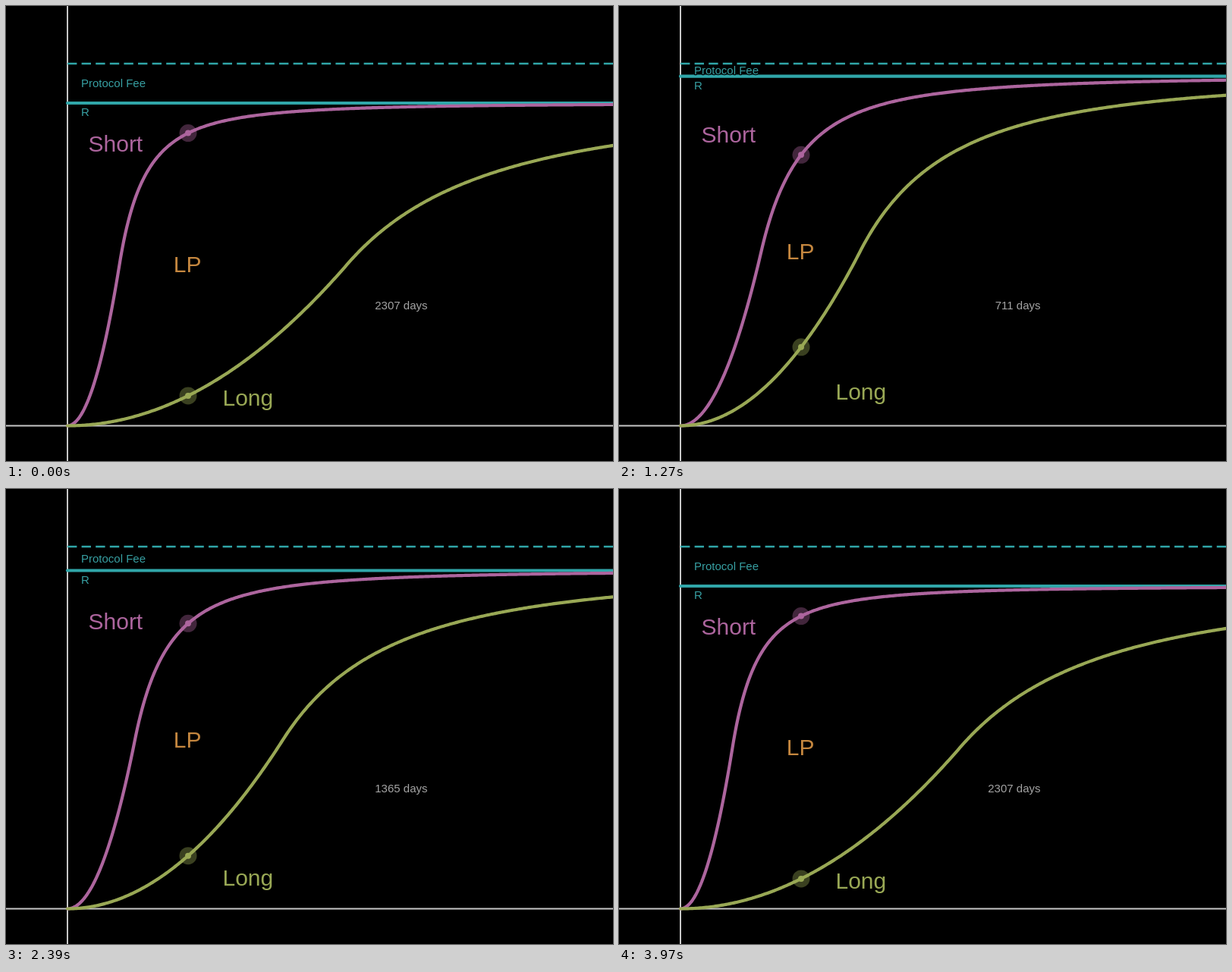
Recreate the animation shown at these times as an HTML page. Size 800 by 600 pixels, loop 4 s.

```html
<!DOCTYPE html>
<html lang="en">
<head>
<meta charset="utf-8">
<title>Decay of long and short payoffs</title>
<style>
  html, body { margin: 0; width: 100%; height: 100%; overflow: hidden; background: #000; }
  svg { display: block; width: 800px; height: 600px; }
  text {
    font: 15px "Liberation Sans", Arial, sans-serif;
    stroke: #000; stroke-width: 2.5; stroke-linejoin: round; paint-order: stroke;
  }
  .big { font-size: 30px; }
  .axis { stroke: #c6c6c6; stroke-width: 2; }
  .curve { fill: none; stroke-width: 4.2; stroke-linecap: round; stroke-linejoin: round; }
  .teal { stroke: #30a6a9; }
  .halo { opacity: .38; }
  .tealText { fill: #379fa2; }
  .purple { fill: #ad659e; }
  .green { fill: #99a855; }
  .orange { fill: #c5873f; }
  .grey { fill: #a3a3a3; }
  .curve.purple { fill: none; stroke: #ad659e; }
  .curve.green { fill: none; stroke: #99a855; }
</style>
</head>
<body>
<svg viewBox="0 0 800 600">
  <path class="axis" d="M0 553.5H800M81 0V600"/>
  <path class="teal" d="M81 76H800" stroke-width="2.5" stroke-dasharray="12.4 6.2"/>
  <path class="teal" id="cap" d="M81 0H800" stroke-width="4.2" stroke-linecap="round"/>
  <path class="curve purple" id="shortCurve"/>
  <path class="curve green" id="longCurve"/>
  <g class="purple" id="shortDot"><circle class="halo" r="11.5"/><circle r="4"/></g>
  <g class="green" id="longDot"><circle class="halo" r="11.5"/><circle r="4"/></g>
  <text class="tealText" id="fee" x="99">Protocol Fee</text>
  <text class="tealText" id="reserve" x="99">R</text>
  <text class="big purple" id="shortLabel" x="108.5">Short</text>
  <text class="big orange" id="lpLabel" x="220.8">LP</text>
  <text class="big green" id="longLabel" x="285.5">Long</text>
  <text class="grey" id="days" x="555.5" y="400.3" text-anchor="end"></text>
</svg>
<script>
const LOOP = 4000, LEFT = 81, RIGHT = 800, BASE = 553.5, TOP = 76, SPOT = 159;
// Day count at sampled ticks (30 per second)
const PACE = [[1, 0], [22, 413], [38, 711], [39, 711], [61, 1172], [83, 1596], [100, 1913], [119, 2307]];
const $ = id => document.getElementById(id);

function dayAt(ms) {
  const tick = Math.floor(ms * 0.03 + 0.25);
  if (tick < 1 || tick >= 119) return 2307;
  const i = PACE.findIndex(p => p[0] > tick);
  const [t0, d0] = PACE[i - 1], [t1, d1] = PACE[i];
  return Math.round(d0 + (d1 - d0) * (tick - t0) / (t1 - t0));
}

// Quadratic growth up to half the reserve, then approaching it
function payoff(u, scale, reserve) {
  const q = scale * (u / SPOT) ** 2;
  return q <= reserve / 2 ? q : reserve - reserve * reserve / (4 * q);
}

function plot(id, scale, reserve) {
  let d = "";
  for (let x = LEFT; x <= RIGHT + 4; x += 2) {
    d += (d ? "L" : "M") + x + " " + (BASE - payoff(x - LEFT, scale, reserve)).toFixed(2);
  }
  $(id).setAttribute("d", d);
}

const move = (id, x, y) => $(id).setAttribute("transform", `translate(${x} ${y.toFixed(2)})`);
const label = (id, y) => $(id).setAttribute("y", y.toFixed(2));

function draw(ms) {
  const day = dayAt(ms);
  const reserve = (BASE - TOP) * Math.exp(-5e-5 * day);
  const long = 159.1 * Math.exp(-6.03e-4 * day);
  const line = BASE - reserve, drop = line - 128;

  plot("shortCurve", reserve * reserve / (4 * long), reserve);
  plot("longCurve", long, reserve);
  move("cap", 0, line);
  move("shortDot", LEFT + SPOT, line + long);
  move("longDot", LEFT + SPOT, BASE - long);

  label("fee", (TOP + line) / 2 + 5.3);
  label("reserve", line + 17.2);
  label("shortLabel", 192 + 0.345 * drop);
  label("lpLabel", 351.2 + 0.5 * drop);
  label("longLabel", 527 + 0.214 * drop);
  $("days").textContent = day + " days";
}

const start = performance.now();
function frame() {
  draw((performance.now() - start) % LOOP);
  requestAnimationFrame(frame);
}
draw(0);
requestAnimationFrame(frame);
</script>
</body>
</html>
```
